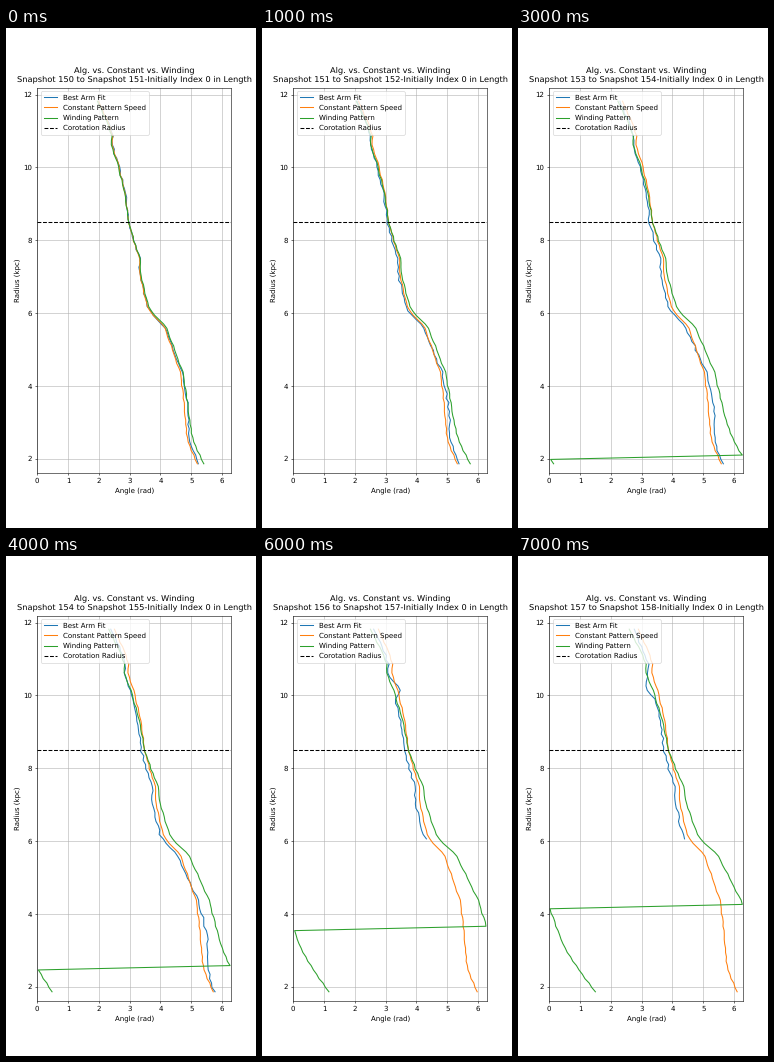
These frames come from a looping animation (250x500 px, 8000 ms). A matplotlib script:

```python
import numpy as np
import matplotlib.pyplot as plt
from matplotlib.animation import FuncAnimation

plt.rcParams["font.family"] = "DejaVu Sans"
plt.rcParams["text.hinting"] = "none"

STEPS = 8
FIRST_SNAPSHOT = 150
COROTATION = 8.49
PATTERN_SPEED = 0.129  # rad per snapshot
SHORT_FIT_STEP = 5     # from here on the fit only reaches the outer arm

rng = np.random.default_rng(4)
radius = 1.86 + 0.12 * np.arange(84)


def profile(*points):
    """Piecewise linear profile through (radius, value) points."""
    return np.interp(radius, *zip(*points))


# Arm angle in rad, from the centre outwards
arm = profile(
    (1.86, 5.18), (2.52, 4.876), (3, 4.81), (3.6, 4.75), (4.2, 4.67),
    (4.4, 4.63), (5.4, 4.22), (5.6, 4.14), (6.1, 3.6), (6.6, 3.45),
    (7.1, 3.33), (7.4, 3.34), (8.4, 2.99), (9.5, 2.8), (10.3, 2.56),
    (10.6, 2.42), (10.85, 2.46), (11.2, 2.32), (11.86, 1.97),
)
arm += rng.uniform(-0.02, 0.02, radius.size)

# Rotation relative to the pattern, rad per snapshot
shear = profile(
    (1.86, 0.21), (2.52, 0.178), (3, 0.138), (3.6, 0.1084), (4.2, 0.0887),
    (6, 0.045), (COROTATION, 0), (11.9, -0.038),
)

fit_noise = rng.uniform(-0.03, 0.03, (STEPS, radius.size))


def fit_offset(step):
    """Offset of the fitted arm: ahead inside, falling behind outside."""
    lag = -0.055 * np.sqrt(step)
    offset = profile(
        (1.86, 0.04), (3.3, 0.11 + 0.03 * step), (4.4, 0.06), (5.6, lag)
    )
    if step >= SHORT_FIT_STEP:
        kink = np.exp(-((radius - 10.2) / 0.2) ** 2)
        offset += 0.22 * (-1) ** step * kink
    return offset + fit_noise[step]


fig, ax = plt.subplots(figsize=(5, 10), dpi=50)
fit_line, = ax.plot([], [], label="Best Arm Fit")
constant_line, = ax.plot([], [], label="Constant Pattern Speed")
winding_line, = ax.plot([], [], label="Winding Pattern")
ax.axhline(COROTATION, color="black", linestyle="--", label="Corotation Radius")
ax.set(
    xlim=(0, 6.29), ylim=(1.607, 12.182),
    xticks=range(7), yticks=range(2, 13, 2),
    xlabel="Angle (rad)", ylabel="Radius (kpc)",
)
ax.grid(True)
ax.legend(loc="upper left")
title = ax.set_title("", fontsize=11.9, pad=9, linespacing=1.25)


def update(step):
    constant = arm + PATTERN_SPEED * step
    winding = (constant + shear * (step + 1)) % (2 * np.pi)
    fit = constant + fit_offset(step)
    fitted = radius > (6 if step >= SHORT_FIT_STEP else 0)

    fit_line.set_data(fit[fitted], radius[fitted])
    constant_line.set_data(constant, radius)
    winding_line.set_data(winding, radius)
    start = FIRST_SNAPSHOT + step
    title.set_text(
        "Alg. vs. Constant vs. Winding\n"
        f"Snapshot {start} to Snapshot {start + 1}-Initially Index 0 in Length"
    )
    return fit_line, constant_line, winding_line, title


anim = FuncAnimation(fig, update, frames=STEPS, interval=1000, repeat=True)
plt.show()
```
